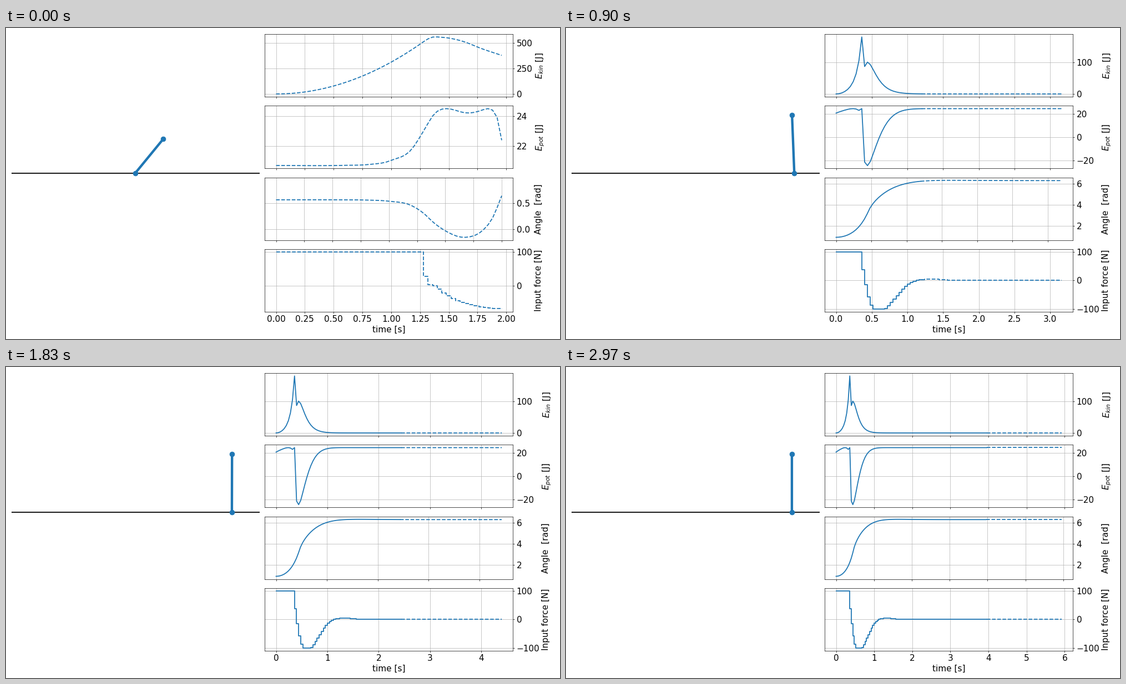
Animation of 998x561 px, one loop 3 s. Source, as a matplotlib script:

```python
import numpy as np
import matplotlib.pyplot as plt
from matplotlib.animation import FuncAnimation

W, H, DPI = 998, 561, 64
FRAMES, INTERVAL = 100, 30
DT, HORIZON = 0.04, 50
POLE, E_MAX = 0.5, 24.525
MASS, POLE_MOMENT, F_MAX = 16, 2.5, 100
GOAL = 1.4

plt.rcParams.update({
    "font.family": "DejaVu Sans",
    "font.size": 17.2,
    "axes.grid": True,
    "axes.linewidth": 0.78,
    "grid.linewidth": 0.78,
    "lines.linewidth": 2,
})


def smooth(points, t):
    """Cubic Hermite curve through (time, value) pairs, flat outside."""
    x, y = np.array(points, float).T
    slope = np.gradient(y, x)
    t = np.clip(t, x[0], x[-1])
    i = np.clip(np.searchsorted(x, t, side="right") - 1, 0, len(x) - 2)
    h = x[i + 1] - x[i]
    s = (t - x[i]) / h
    return ((1 + 2 * s) * (1 - s) ** 2 * y[i] + s * (1 - s) ** 2 * h * slope[i]
            + s * s * (3 - 2 * s) * y[i + 1] + s * s * (s - 1) * h * slope[i + 1])


# Closed-loop run: the pole falls through the bottom, then settles upright
time = np.arange(FRAMES + HORIZON + 1) * DT
falling = time < 0.42
t_fall = np.minimum(time, 0.44)
s = np.maximum(time - 0.44, -0.04)

theta = np.where(
    falling,
    0.3 * np.pi + 0.613 * (np.cosh(5 * t_fall) - 1),
    2 * np.pi - 2.78 * np.exp(-3.2 * s) * np.cos(1.707 * s)
    - 0.37 * np.exp(-22 * s))

push = F_MAX / 2 * t_fall ** 2
cart = np.where(
    falling,
    (push + POLE_MOMENT * (np.sin(theta[0]) - np.sin(theta))) / MASS,
    GOAL + np.exp(-4.2 * s) * (0.55 * np.sin(3.5 * s) - 0.67 * np.cos(3.5 * s)))

e_kin = np.where(
    time < 0.38,
    500 * t_fall ** 2 * np.exp(22 * t_fall ** 3),
    101 * np.exp(-9.3 * s ** 2 / (s + 0.14)))

# Lean that the controller assumes until its plan becomes feasible
lean = np.where(time < 0.34, 0.567 - 1.8 * time - 10.5 * time ** 3, 0)
e_pot = E_MAX * np.cos(np.where(time < 0.38, lean, theta))

swing_force = smooth([
    (.36, 37), (.4, -15), (.48, -87), (.58, -112), (.68, -98.5), (.84, -53),
    (1, -13), (1.12, 0), (1.28, 4.8), (1.56, 1.5), (2, 0), (2.4, 0)], time)
force = np.where(time < 0.34, F_MAX, np.clip(swing_force, -F_MAX, F_MAX))

# First open-loop plan
ahead = np.arange(HORIZON + 1) * DT
full_push = ahead < 1.27
rest = np.maximum(ahead - 1.28, 0)

plan_theta = smooth([
    (0, .567), (.6, .566), (.8, .562), (1, .54), (1.2, .457), (1.3, .322),
    (1.4, .122), (1.5, -.03), (1.68, -.155), (1.84, -.005), (1.92, .22),
    (2, .645)], ahead)
plan_kin = np.where(full_push, (F_MAX * ahead) ** 2 / (2 * MASS), smooth([
    (1.28, 512), (1.34, 552), (1.44, 556), (1.6, 524), (1.8, 439),
    (2, 364)], ahead))
plan_force = np.where(
    full_push, F_MAX,
    29 * np.exp(-rest / 0.018)
    - 72 * np.maximum(0, 1 - np.exp((0.09 - rest) / 0.21)))


def forecast(k):
    """Predicted kinetic energy, potential energy, angle and force."""
    window = slice(k, k + HORIZON + 1)
    if k >= 10:
        return [a[window] for a in (e_kin, e_pot, theta, force)]
    w = k / 10
    angle = plan_theta * lean[k] / lean[0]
    kin = plan_kin * (1 - w) + e_kin[k] * np.exp(-ahead / 0.2)
    return [kin, E_MAX * np.cos(angle), angle,
            plan_force * (1 - w) + force[window] * w]


fig = plt.figure(figsize=(W / DPI, H / DPI), dpi=DPI, facecolor="white")
top, bottom = 1 - 11 / H, 1 - 512 / H

scene = fig.add_axes([9.6 / W, bottom, 447 / W, top - bottom])
scene.set(xlim=(-1.8, 1.8), ylim=(-1.2, 1.2))
scene.axis("off")
scene.axhline(0, color="black")
pole, = scene.plot([], [], "-o", color="C0", lw=4.9, ms=9.8)

grid = fig.add_gridspec(4, 1, left=466.2 / W, right=913.3 / W,
                        top=top, bottom=bottom, hspace=0.1432)
labels = ["$E_{kin}$ [J]", "$E_{pot}$ [J]", "Angle  [rad]", "Input force [N]"]
history = [e_kin, e_pot, theta, force]
panels, solid, dashed = [], [], []
for row, label in enumerate(labels):
    ax = fig.add_subplot(grid[row])
    ax.yaxis.tick_right()
    ax.yaxis.set_label_position("right")
    ax.set_ylabel(label)
    ax.tick_params(labelbottom=row == 3)
    style = "steps-post" if row == 3 else "default"
    solid += ax.plot([], [], color="C0", drawstyle=style)
    dashed += ax.plot([], [], "--", color="C0", drawstyle=style)
    panels.append(ax)
panels[-1].set_xlabel("time [s]")
fig.align_ylabels(panels)


def update(k):
    x, a = cart[k], theta[k]
    pole.set_data([x, x + POLE * np.sin(a)], [0, POLE * np.cos(a)])
    for row, future in enumerate(forecast(k)):
        n = HORIZON + (row == 2)  # states reach one step further
        solid[row].set_data(time[:k + 1], history[row][:k + 1])
        dashed[row].set_data(time[k:k + n], future[:n])
        panels[row].relim()
        panels[row].autoscale_view()
    return [pole, *solid, *dashed]


anim = FuncAnimation(fig, update, frames=FRAMES, interval=INTERVAL,
                     repeat=True, repeat_delay=0, blit=False)
plt.show()
```
